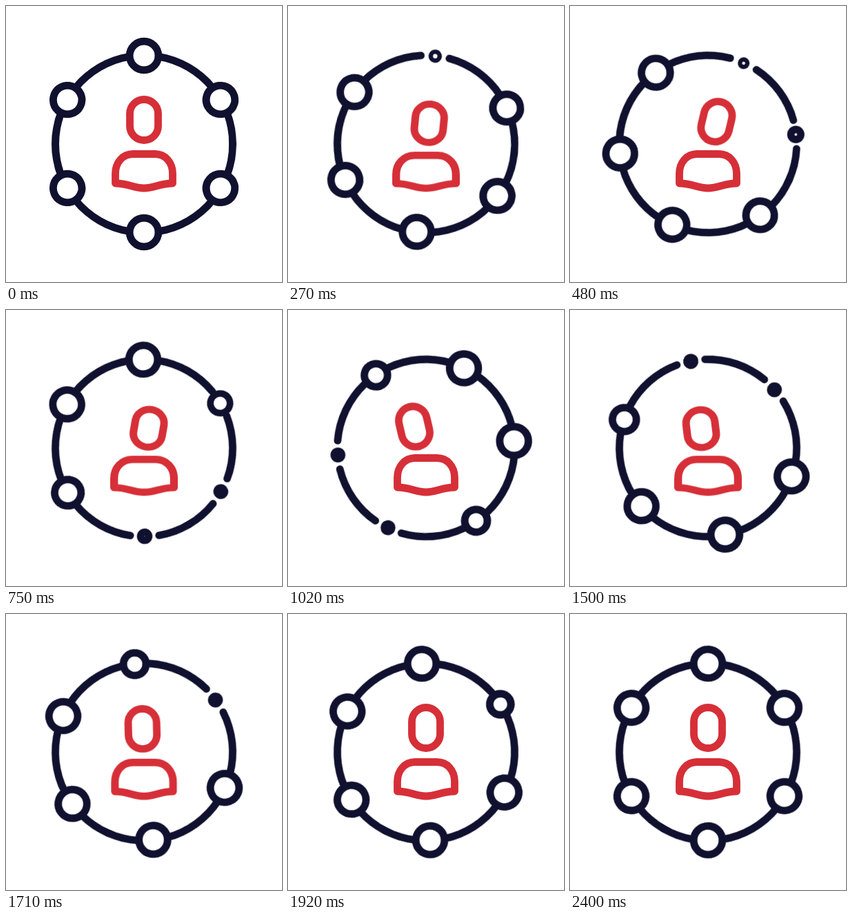
These frames come from a looping animation (400 by 400 pixels, 4430 ms). An HTML page without scripts:

```html
<!DOCTYPE html>
<html lang="en">
<head>
<meta charset="utf-8">
<title>Team ring</title>
<style>
  html, body { margin: 0; width: 100%; height: 100%; overflow: hidden; background: #fff; }
  svg { display: block; width: 100%; height: 100%; }

  .ring, .person {
    fill: none;
    stroke-width: 10.8px;
    stroke-linecap: round;
    stroke-linejoin: round;
  }
  .ring { stroke: #10112f; transform-origin: 200px 200px; animation: turn 4.43s infinite; }
  .person { stroke: #d62f38; }

  .node {
    fill: #fff;
    r: 20.8px;
    animation: pulse 4.43s calc(var(--i) * .23s) infinite;
  }
  .first { animation: pulse 4.43s infinite, thin 4.43s infinite; }
  .head { transform-origin: 200px 165px; animation: sway 4.43s infinite; }
  .body { transform-origin: 200px 266px; animation: squash 4.43s ease-in-out infinite; }

  @keyframes turn {
    0% { transform: rotate(0deg); animation-timing-function: cubic-bezier(.338, 0, .167, 1); }
    54.18%, 100% { transform: rotate(120deg); }
  }
  @keyframes pulse {
    0% { r: 20.8px; animation-timing-function: cubic-bezier(.3, 0, .6, 1); }
    7.5% { r: 5.4px; }
    12.5% { r: 5.4px; animation-timing-function: cubic-bezier(.33, 0, .4, 1); }
    22.6%, 100% { r: 20.8px; }
  }
  @keyframes thin {
    0%, 22.8%, 100% { stroke-width: 10.8px; }
    7%, 12.64% { stroke-width: 6.4px; }
  }
  @keyframes sway {
    0% { transform: none; animation-timing-function: ease-in; }
    5.4% { transform: translate(3px, 5.5px) rotate(4deg) scale(1.02, .93); animation-timing-function: ease-out; }
    12.2% { transform: translate(13px, 2.5px) rotate(14deg); animation-timing-function: ease-in; }
    16.93% { transform: translate(7px, 6.5px) rotate(10deg) scale(1.02, .93); animation-timing-function: ease-out; }
    23.02% { transform: translate(-17px, 4px) rotate(-13deg); animation-timing-function: ease-out; }
    26% { transform: translate(-18px, 3.5px) rotate(-14deg); animation-timing-function: ease-in; }
    33.86% { transform: translate(-10px, 7px) rotate(-7deg) scale(1.02, .93); animation-timing-function: ease-out; }
    41.8%, 100% { transform: none; }
  }
  @keyframes squash {
    0%, 10.8%, 23%, 26%, 41.8%, 100% { transform: none; }
    5.4%, 16.93%, 33.86% { transform: scale(1.045, .96); }
  }
</style>
</head>
<body>
<svg viewBox="0 0 400 400">
  <g class="ring">
    <g transform="rotate(-90 200 200)">
      <circle cx="200" cy="200" r="128.5" pathLength="360" stroke-dasharray="41.4 18.6" stroke-dashoffset="-9.3"/>
      <circle class="node first" cx="328" cy="200" r="20.8"/>
      <circle class="node" style="--i:1" cx="328" cy="200" r="20.8" transform="rotate(60 200 200)"/>
      <circle class="node" style="--i:2" cx="328" cy="200" r="20.8" transform="rotate(120 200 200)"/>
      <circle class="node" style="--i:3" cx="328" cy="200" r="20.8" transform="rotate(180 200 200)"/>
      <circle class="node" style="--i:4" cx="328" cy="200" r="20.8" transform="rotate(240 200 200)"/>
      <circle class="node" style="--i:5" cx="328" cy="200" r="20.8" transform="rotate(300 200 200)"/>
    </g>
  </g>
  <g class="person">
    <rect class="head" x="179.5" y="135.5" width="41" height="59" rx="20.5"/>
    <path class="body" d="M158.5 257V243C158.5 227 169 214.5 184 214.5H216C231 214.5 241.5 227 241.5 243V257C222 257 216 264 200 264S178 257 158.5 257Z"/>
  </g>
</svg>
</body>
</html>
```
